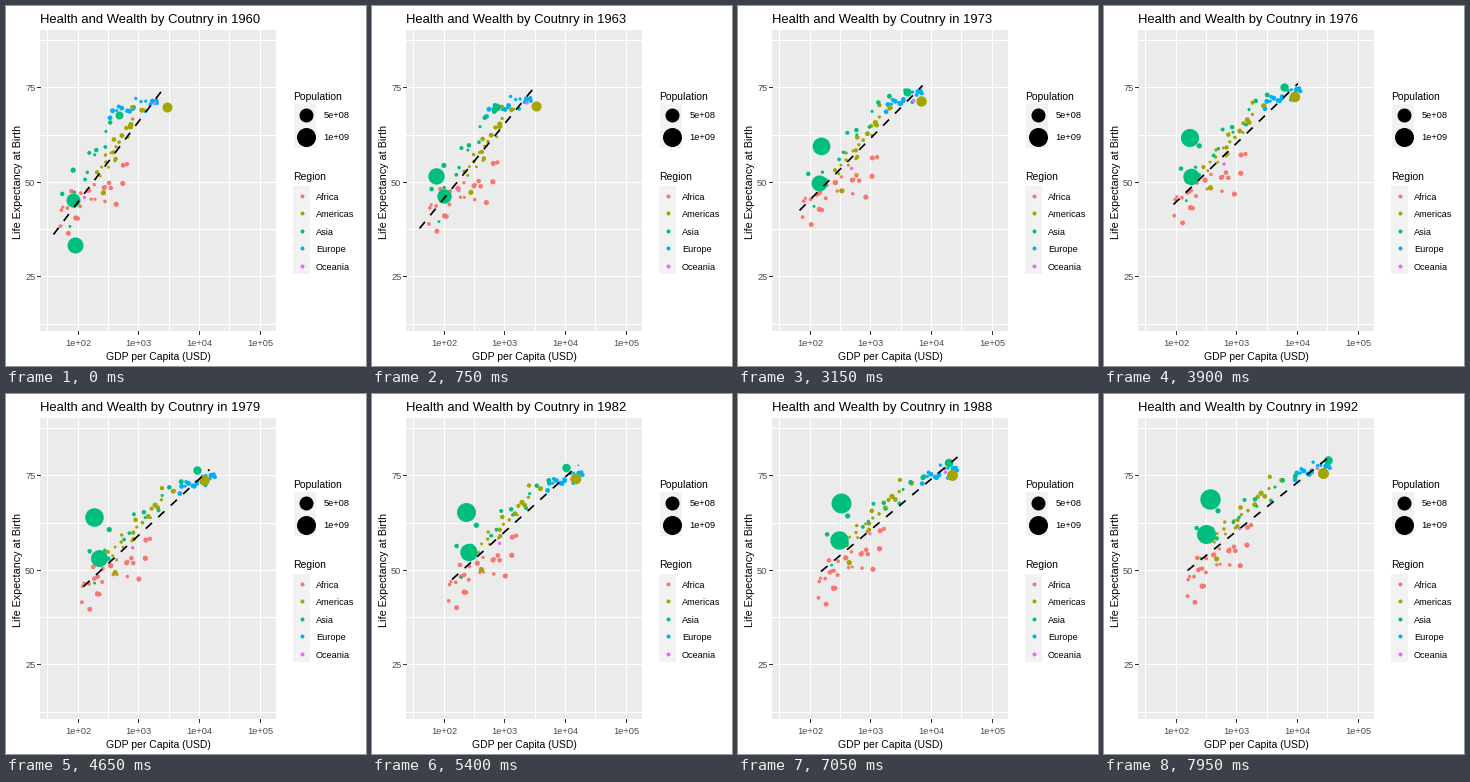
A matplotlib script that plays this animation: 360x360 px, repeating every 8000 ms.

```python
import matplotlib.pyplot as plt
import numpy as np
from matplotlib.animation import FuncAnimation
from matplotlib.patches import Rectangle

plt.rcParams["font.family"] = "Liberation Sans"

SIZE, INTERVAL, LOOP, HOLD = 360, 50, 8000, 3
START, MIDDLE, END = 1960, 1972.7, 1992.1
KEY_YEARS = [START, 1963, MIDDLE, 1978.8, 1984.85, END]
COLORS = {"Africa": "#F8766D", "Americas": "#A3A500", "Asia": "#00BF7D",
          "Europe": "#00B0F6", "Oceania": "#E76BF3"}

# Positions are in stage pixels, y pointing down.
# Region: count, scatter, then poorest and richest end at START, MIDDLE, END
REGIONS = {
    "Africa": (26, 12, [(54, 216), (64, 207), (83, 198)],
               [(116, 172), (134, 165), (142, 145)]),
    "Europe": (18, 3.5, [(104, 106), (148, 100), (191, 80)],
               [(152, 94), (184, 84), (226, 71)]),
    "Americas": (24, 8, [(90, 178), (96, 176), (104, 156)],
                 [(134, 104), (150, 102), (176, 86)]),
    "Asia": (14, 8, [(56, 208), (68, 188), (89, 152)],
             [(112, 116), (150, 96), (190, 88)]),
    "Oceania": (2, 0, [(78, 191), (113, 162), (135, 134)],
                [(148, 97), (175, 94), (213, 74)]),
}

# Largest countries: region, first and last radius, path over KEY_YEARS
GIANTS = [
    ("Americas", 5, 5.5, [(161, 101), (164, 100), (183, 95),
                          (198, 86), (209, 83), (219, 79)]),
    ("Asia", 4, 4.3, [(113, 109), (124, 101), (169, 86),
                      (191, 76), (197, 71), (224, 66)]),
    ("Asia", 8, 10.2, [(69, 239), (64, 170), (83, 140),
                       (88, 123), (100, 113), (106, 105)]),
    ("Asia", 7, 9.5, [(67, 194), (72, 190), (81, 177),
                      (93, 164), (100, 152), (102, 140)]),
]
TREND = [[(47, 228), (47, 222), (61, 204), (77, 192), (82, 178), (83, 176)],
         [(157, 82), (164, 78), (184, 79), (203, 75), (209, 66), (229, 59)]]

fig = plt.figure(figsize=(SIZE / 72, SIZE / 72), dpi=72, facecolor="white")
ax = fig.add_axes([0, 0, 1, 1])
ax.set_xlim(-.5, SIZE - .5)
ax.set_ylim(SIZE - .5, -.5)
ax.axis("off")


def box(x, y, w, h, color):
    ax.add_patch(Rectangle((x - .5, y - .5), w, h, fc=color, lw=0,
                           antialiased=False, zorder=0))


def rule(xs, ys, color):
    # Half a pixel back, so that snapping lands on the named pixel
    ax.plot(np.array(xs) - .5, np.array(ys) - .5, color=color, lw=1,
            antialiased=False, zorder=1)


def label(x, y, text, size, color="black", **kw):
    kw = {"ha": "left", "va": "baseline", **kw}
    return ax.text(x, y, text, fontsize=size, color=color, **kw)


def areas(radii):
    return (2 * np.array(radii)) ** 2


def dots(points, radii, colors):
    xs, ys = np.transpose(points)
    return ax.scatter(xs, ys, s=areas(radii), c=colors, linewidths=0,
                      snap=False, zorder=2)


def draw_panel():
    box(34, 24, 236, 301, "#EBEBEB")
    grid_x = 41.2 + 30.33 * np.arange(8)
    grid_y = 34.2 + 47.25 * np.arange(7)
    for x in grid_x:
        rule([x, x], [24, 325], "white")
    for y in grid_y:
        rule([34, 270], [y, y], "white")
    for power, x in enumerate(grid_x[1::2], start=2):
        rule([x, x], [325, 328], "#333333")
        label(x, 339, f"1e+0{power}", 9.3, "#4D4D4D", ha="center")
    for value, y in zip((75, 50, 25), grid_y[1::2]):
        rule([31, 34], [y, y], "#333333")
        label(29, y + 3.5, str(value), 9.3, "#4D4D4D", ha="right")
    label(152, 353, "GDP per Capita (USD)", 10.4, ha="center")
    label(17, 175, "Life Expectancy at Birth", 10.7, ha="right",
          va="center", rotation=90)


def draw_legend():
    label(287, 94, "Population", 10.4)
    box(288, 98, 22, 44, "#F2F2F2")
    for y, radius, text in ((108, 7, "5e+08"), (130, 9.5, "1e+09")):
        dots([(299, y)], [radius], "black")
        label(317, y + 3.5, text, 9.3)
    label(287, 174, "Region", 10.4)
    box(287, 180, 17, 88, "#F2F2F2")
    for i, (region, color) in enumerate(COLORS.items()):
        y = 189 + 17.6 * i
        dots([(295, y)], [2], color)
        label(309.5, y + 4, region, 9.1)


def along(path, year):
    xs, ys = np.transpose(path)
    return np.array([np.interp(year, KEY_YEARS, xs),
                     np.interp(year, KEY_YEARS, ys)])


def region_end(path, year):
    """Life expectancy rises evenly, income booms in the seventies."""
    xs, ys = np.transpose(path)
    wealth = np.interp(year, KEY_YEARS[:1] + KEY_YEARS[2:],
                       [0, 1, 1.6, 1.68, 2])
    return np.array([np.interp(wealth, [0, 1, 2], xs),
                     np.interp(year, [START, MIDDLE, END], ys)])


def make_clouds():
    rng = np.random.default_rng(7)
    clouds = []
    for region, (count, scatter, poor, rich) in REGIONS.items():
        rank = np.linspace(0, 1, count)[:, None]
        offset = rng.normal(0, scatter, (count, 2)).clip(-2 * scatter,
                                                         2 * scatter)
        radii = rng.uniform(1.4, 2.7, count)
        clouds.append((region, rank, offset * [.5, 1], radii, poor, rich))
    return clouds


def scene(year):
    points, radii = [], []
    for _, rank, offset, sizes, poor, rich in clouds:
        low, high = region_end(poor, year), region_end(rich, year)
        points.extend(low + rank * (high - low) + offset)
        radii.extend(sizes)
    for _, first, last, path in GIANTS:
        points.append(along(path, year))
        radii.append(np.interp(year, [START, END], [first, last]))
    return points, radii


draw_panel()
draw_legend()
clouds = make_clouds()
point_colors = [COLORS[cloud[0]] for cloud in clouds for _ in cloud[1]]
point_colors += [COLORS[giant[0]] for giant in GIANTS]
cloud_dots = dots(*scene(START), point_colors)
title = label(34, 17, "", 13)
trend, = ax.plot([], [], color="black", lw=1.7, dashes=(5, 5),
                 dash_capstyle="butt", zorder=3)


def update(frame):
    year = START + frame // HOLD * 60 / 99
    points, radii = scene(year)
    cloud_dots.set_offsets(points)
    cloud_dots.set_sizes(areas(radii))
    trend.set_data(*np.transpose([along(path, year) for path in TREND]))
    title.set_text(f"Health and Wealth by Coutnry in {round(year)}")
    return cloud_dots, trend, title


anim = FuncAnimation(fig, update, frames=LOOP // INTERVAL, interval=INTERVAL,
                     repeat=True, repeat_delay=0)
plt.show()
```
